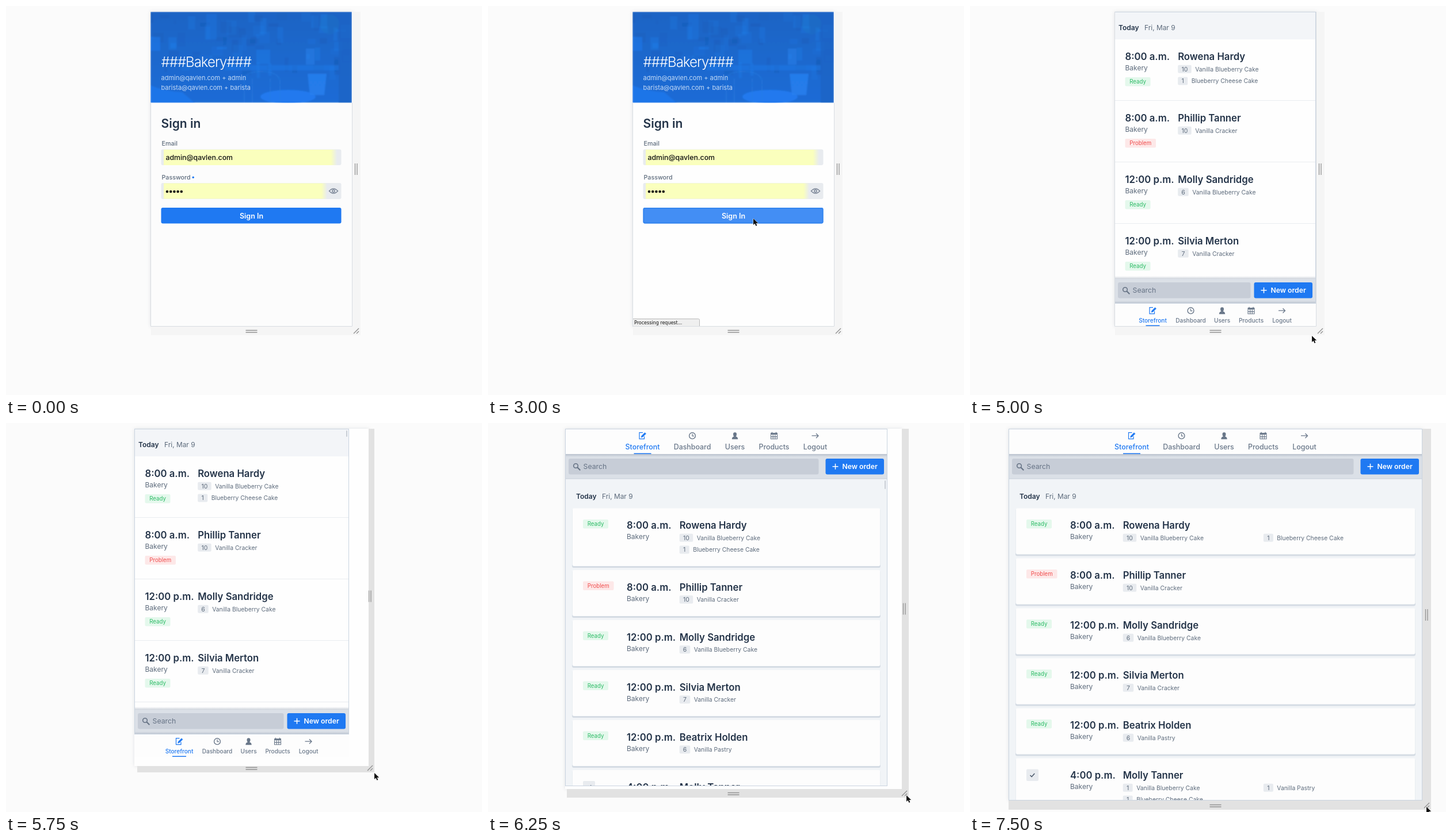
An HTML page that plays this animation: 827x677 px, repeating every 8000 ms.

```html
<!DOCTYPE html>
<html lang="en">
<head>
<meta charset="utf-8">
<title>Bakery app resize</title>
<style>
html, body { margin: 0; width: 100%; height: 100%; overflow: hidden; background: #fbfbfb; }
svg { display: block; width: 100%; height: 100%; }
text { font-family: Inter, Roboto, sans-serif; white-space: pre; }
</style>
</head>
<body>
<svg viewBox="0 0 827 677">
  <defs>
    <linearGradient id="fill">
      <stop offset="0" stop-color="#faffbd"/>
      <stop offset=".965" stop-color="#faffbd"/>
      <stop offset="1" stop-color="#e8ebef"/>
    </linearGradient>
    <linearGradient id="photo" x2="0" y2="1">
      <stop offset="0" stop-color="#1b64c4"/>
      <stop offset="1" stop-color="#1c6cd6"/>
    </linearGradient>
    <linearGradient id="shade" x2="0" y2="1">
      <stop offset="0" stop-color="#8592a6" stop-opacity=".4"/>
      <stop offset="1" stop-color="#8592a6" stop-opacity="0"/>
    </linearGradient>
    <linearGradient id="shadeUp" x2="0" y2="1">
      <stop offset="0" stop-color="#8592a6" stop-opacity="0"/>
      <stop offset="1" stop-color="#8592a6" stop-opacity=".4"/>
    </linearGradient>
    <filter id="soft" x="-20%" y="-20%" width="140%" height="140%"><feGaussianBlur stdDeviation="3"/></filter>
    <filter id="blur"><feGaussianBlur stdDeviation="1.2"/></filter>
    <clipPath id="photoClip"><path d="M251 10h350v158.500h-350z"/></clipPath>
  </defs>
  <g id="stage"></g>
</svg>
<script>
const LOOP = 8000, STEP = 250, TOP = 10, MID = 426.5;
const BLUE = '#1f79f2', INK = '#233348', GREY = '#5d6b7c', NAV = '#697789';
const stage = document.getElementById('stage');

// time, then cursor tip
const cursorKeys = [
  [250, 623, 550], [1250, 601, 450], [1500, 460, 366], [2500, 461, 370], [4000, 461, 370],
  [4250, 474, 390], [4750, 570, 545], [5000, 594, 574], [5250, 606, 566], [5500, 606, 566],
  [5750, 640, 609], [6250, 727, 648], [6750, 778, 661], [7000, 793, 668]
];
// time, grip right and bottom, frame right and bottom, page width and bottom
const sizeKeys = [
  [5500, 616, 573, 602, 558, 350, 558], [5750, 640, 608, 630, 597, 373, 582],
  [6250, 731, 652, 719, 637, 560, 632], [6750, 787, 668, 780, 654, 694, 652],
  [7000, 801, 673, 786, 657, 719, 657]
];
const orders = [
  ['8:00 a.m.', 'Ready', 'Rowena Hardy', ['10', 'Vanilla Blueberry Cake'], ['1', 'Blueberry Cheese Cake']],
  ['8:00 a.m.', 'Problem', 'Phillip Tanner', ['10', 'Vanilla Cracker']],
  ['12:00 p.m.', 'Ready', 'Molly Sandridge', ['6', 'Vanilla Blueberry Cake']],
  ['12:00 p.m.', 'Ready', 'Silvia Merton', ['7', 'Vanilla Cracker']],
  ['12:00 p.m.', 'Ready', 'Beatrix Holden', ['6', 'Vanilla Pastry']],
  ['4:00 p.m.', '', 'Molly Tanner', ['1', 'Vanilla Blueberry Cake'], ['1', 'Vanilla Pastry'], ['1', 'Blueberry Cheese Cake']]
];

const rect = (x, y, w, h, fill, more = '') => `<rect x="${x}" y="${y}" width="${w}" height="${h}" fill="${fill}" ${more}/>`;
const line = (d, color, w = 1, more = '') => `<path d="${d}" fill="none" stroke="${color}" stroke-width="${w}" ${more}/>`;
const text = (x, y, s, size, weight, fill, more = '') =>
  `<text x="${x}" y="${y}" font-size="${size}" font-weight="${weight}" fill="${fill}" ${more}>${s}</text>`;
const middle = 'text-anchor="middle"';
const at = (x, y, body) => `<g transform="translate(${x} ${y})">${body}</g>`;

function tween(keys, t) {
  const i = keys.findIndex(k => k[0] > t);
  if (i === 0) return keys[0].slice(1);
  if (i < 0) return keys[keys.length - 1].slice(1);
  const a = keys[i - 1], b = keys[i], p = (t - a[0]) / (b[0] - a[0]);
  return a.slice(1).map((v, n) => v + (b[n + 1] - v) * p);
}

function makePhoto() {
  let seed = 11, s = rect(251, 10, 350, 158.5, 'url(#photo)');
  const rnd = () => (seed = seed * 16807 % 2147483647) / 2147483647;
  for (let i = 0; i < 70; i++) {
    const x = 251 + rnd() * 335, y = 10 + rnd() * 95;
    s += rect(x, y, 4 + rnd() * 16, 4 + rnd() * 24, rnd() < .5 ? '#1857ae' : '#2380ee', `opacity="${.1 + rnd() * .25}"`);
  }
  s += rect(251, 54, 17, 24, '#2079ec', 'opacity=".6"') + rect(348, 14, 18, 44, '#2079e6', 'opacity=".35"')
    + rect(435, 76, 24, 25, '#2580ee', 'opacity=".4"') + rect(521, 74, 15, 28, '#2782ee', 'opacity=".5"')
    + rect(380, 103, 198, 9, '#217bea', 'opacity=".5"')
    + '<circle cx="562" cy="32" r="17" fill="#2379c4" opacity=".3"/>'
    + '<ellipse cx="490" cy="158" rx="48" ry="12" fill="#2079ee"/>'
    + '<path d="M524 118h33l-4 37h-25z" fill="#2780f0" opacity=".8"/>'
    + '<path d="M251 138q22 10 55 12l22 19h-77z" fill="#2079ee" opacity=".8"/>'
    + line('M414 168v-40q2-14 30-14t32 16v38M428 168v-42M459 168v-42', '#2b80e4', 1.5, 'opacity=".5"')
    + rect(578, 10, 23, 159, '#1b65c6', 'opacity=".8"');
  return `<g clip-path="url(#photoClip)"><g filter="url(#blur)">${s}</g></g>`;
}
const photo = makePhoto();

function signIn(t) {
  const pressed = t >= 2750;
  let s = rect(251, 10, 350, 548, t < 1500 ? '#fcfcfc' : '#fefefe') + photo
    + text(269.5, 106, '###Bakery###', 24, 300, '#fff', 'letter-spacing="-1"')
    + text(269.5, 129, 'admin@qavlen.com + admin', 11, 400, '#c6dcf7')
    + text(269.5, 146, 'barista@qavlen.com + barista', 11, 400, '#c6dcf7')
    + text(269.5, 212, 'Sign in', 21, 600, INK)
    + text(270.5, 243, 'Email', 10.7, 500, GREY)
    + rect(269.5, 249.5, 313, 27.5, '#e8ebef', 'rx="3"') + rect(274, 250, 301, 27, 'url(#fill)')
    + text(277.5, 268, 'admin@qavlen.com', 12.3, 500, '#111')
    + text(270.5, 301.5, 'Password', 10.7, 500, GREY)
    + rect(269.5, 308, 313, 28, '#e8ebef', 'rx="3"') + rect(274, 308.5, 284, 27, 'url(#fill)');
  if (!pressed) s += `<circle cx="325.200" cy="298.300" r="1.700" fill="${BLUE}"/>`;
  for (let i = 0; i < 5; i++) s += `<circle cx="${280 + i * 6.2}" cy="323" r="2.300" fill="#111"/>`;
  s += line('M561.500 322q7.500-8 15 0q-7.500 8-15 0z', '#7a8596', 1.5)
    + '<circle cx="569" cy="322" r="2" fill="none" stroke="#7a8596" stroke-width="1.500"/>'
    + rect(269.5, 351, 313, 27.5, pressed ? '#438ef4' : BLUE, 'rx="3"');
  if (pressed) s += rect(270.5, 352, 311, 25.5, 'none', 'rx="2" stroke="#3585ef" stroke-width="2"');
  s += text(MID, 369.5, 'Sign In', 12.5, 600, '#fff', middle);
  if (t >= 3000) {
    s += '<path d="M251.500 544.500h114q2 0 2 2v11h-116z" fill="#efefef" stroke="#b9b9b9"/>'
      + text(254, 554, 'Processing request...', 8, 400, '#111', 'style="font-family:\'DejaVu Sans\',sans-serif"');
  }
  return s;
}

const icons = [
  c => line('M3 1v4.500h-8.500v-11h6', c, 1.2) + line('M-2.500 3l1-3L4-5.500 6-3.500.5 2z', c, .6, `style="fill:${c}"`),
  c => `<circle r="5.400" fill="none" stroke="${c}" stroke-width="1.400"/>` + line('M0-3.500V.5h3', c, 1.2),
  c => `<path d="M0-6q3 0 3 3.300Q3 .5 1.500 1.300q3.700.8 3.700 4.700H-5.200q0-3.900 3.700-4.700Q-3 .5-3-2.700-3-6 0-6z" fill="${c}"/>`,
  c => rect(-6, -5, 12, 3, c) + line('M-5.500-2v7.500h11v-7.500M-5.500 1.700h11M-1.800-2v7.500M1.800-2v7.500', c, 1.1) + line('M-3.500-6.500v2M3.500-6.500v2', c, 1.4),
  c => line('M-6 0H5.500M1.500-4l4 4-4 4', c, 1.3)
];
const tabs = ['Storefront', 'Dashboard', 'Users', 'Products', 'Logout'];

function nav(cx, y, wide, active) {
  const xs = wide ? [-145.5, -59, 15, 83, 154.5] : [-108.5, -42.5, 12, 62.5, 116];
  const size = wide ? 12.4 : 10.1;
  let s = tabs.map((name, i) => {
    const color = active && i === 0 ? BLUE : NAV;
    return at(cx + xs[i], y + 12.2, icons[i](color))
      + text(cx + xs[i], y + (wide ? 36 : 33), name, size, 500, color, middle);
  }).join('');
  const half = wide ? 15 : 12;
  if (active) s += rect(cx + xs[0] - half, y + (wide ? 42.5 : 37.5), half * 2, 1.5, BLUE);
  return s;
}

function toolbar(x, y, right, wide) {
  const bx = right - 107.5, gap = wide ? 12 : 6, top = y + (wide ? 8 : 6), w = right - x;
  const edges = wide
    ? rect(x, y, w, 5, 'url(#shade)') + line(`M${x} ${y + 43}H${right}`, '#c6ced9')
    : rect(x, y - 5, w, 5, 'url(#shadeUp)') + rect(x, y + 38, w, 5, 'url(#shadeUp)');
  return rect(x, y, w, 43, '#dbe0e7') + edges
    + rect(x + 6, top, bx - gap - x - 6, 27.5, '#c7cdd7', 'rx="3"')
    + at(x + 18.5, top + 12.5, '<circle r="3.800" fill="none" stroke="#667385" stroke-width="1.600"/>' + line('M2.800 2.800l5 5', '#667385', 2))
    + text(x + 31.5, top + 18.2, 'Search', 12.3, 400, '#677486')
    + rect(bx, top, 101.5, 27.5, BLUE, 'rx="3"')
    + line(`M${bx + 12} ${top + 13.7}h10m-5-5v10`, '#fff', 1.5)
    + text(bx + 29, top + 18.2, 'New order', 12.2, 600, '#fff');
}

function badge(x, y, status) {
  if (!status) return rect(x, y - 8, 21, 20.5, '#e8ebef', 'rx="2"') + line(`M${x + 6.5} ${y + 2.5}l2.700 2.700 5-5.700`, '#4b596b', 1.6);
  const ok = status === 'Ready', w = ok ? 44 : 53.5;
  return rect(x, y - 7.5, w, 15.5, ok ? '#e4f8ec' : '#fde8e8', 'rx="2"')
    + text(x + w / 2, y + 3.6, status, 9.7, 400, ok ? '#2dbb66' : '#f04c4c', middle);
}

function product(x, y, [count, name]) {
  const w = count === '10' ? 23.5 : count === '1' ? 17 : 18.5;
  return rect(x, y - 7, w, 14, '#e8ebef', 'rx="2"')
    + text(x + w / 2, y + 3.8, count, 10.5, 400, GREY, middle)
    + text(x + w + 6.5, y + 3.8, name, 10.35, 400, GREY);
}

function orderList(x, right, wide, double) {
  const dayX = x + (wide ? 19 : 7), dayY = wide ? 132.3 : 42.3;
  let s = wide ? '' : rect(x, TOP, right - x, 48, '#f3f5f8');
  s += text(dayX, dayY, 'Today', 12, 600, INK) + text(dayX + 45, dayY, 'Fri, Mar 9', 11.9, 400, GREY);
  let y = wide ? 148.5 : 58;
  const timeX = x + (wide ? 107 : 18.5), nameX = timeX + 91.7;
  for (const [time, status, name, ...items] of orders) {
    const rows = double ? Math.ceil(items.length / 2) : items.length;
    const h = wide ? 80 + 20.5 * (rows - 1) : 107;
    if (wide) {
      const w = right - x - 25;
      s += rect(x + 12, y + 1, w + 1, h + 2, '#d5dce4', 'rx="3"') + rect(x + 12.5, y, w, h, '#fdfdfd', 'rx="3"');
    } else {
      s += rect(x, y, right - x, h, '#fefefe') + line(`M${x} ${y + h - .5}H${right}`, '#e9ecf0');
    }
    const top = wide ? y : y + .5;
    s += text(timeX, top + 35.5, time, 16.7, 600, INK) + text(timeX, top + 53.7, 'Bakery', 12, 400, GREY)
      + text(nameX, top + 35.5, name, 16.7, 600, INK)
      + badge(wide ? x + 31 : timeX, wide ? y + 27 : y + 73.5, status);
    const second = (nameX + right - 32) / 2;
    items.forEach((item, i) => {
      const col = double ? i % 2 : 0, row = double ? i >> 1 : i;
      s += product(col ? second : nameX, top + 51.3 + row * 20.6, item);
    });
    y += wide ? h + 7 : h;
  }
  return s;
}

function storefront(t, x, width, bottom) {
  const wide = width >= 466, double = width >= 622, loaded = t >= 4250;
  const right = x + width, cx = x + width / 2;
  const h = bottom - TOP, navY = wide ? TOP : bottom - 40, barY = wide ? 54 : bottom - 83;
  let s = rect(x, TOP, width, h, wide ? '#f1f4f7' : '#f4f6f9');
  if (loaded) s += orderList(x, right, wide, double);
  s += rect(x, navY, width, wide ? 44 : 40, loaded ? '#fdfdfd' : '#f7f8fa') + toolbar(x, barY, right, wide)
    + nav(cx, navY, wide, loaded);
  if (t >= 5750 && t < 7500) s += rect(right - 5, wide ? 100 : 13, 2, wide ? 15 : 11, '#c9ced5', 'rx="1"');
  const edge = wide ? h : h - 40;
  s += rect(x + .5, TOP + .5, width - 1, edge - 1, 'none', 'stroke="#cad4e0"');
  return `<clipPath id="page">${rect(x, TOP, width, h, '#000')}</clipPath><g clip-path="url(#page)">${s}</g>`;
}

function frame(t) {
  const [gripR, gripB, right, bottom, width, pageB] = tween(sizeKeys, t);
  const left = 2 * MID - right, gripL = 2 * MID - gripR + 15;
  const strip = t >= 5750 ? '#e2e2e2' : '#f5f5f5', mark = '#929292';
  const x = gripR - 8, y = gripB - 7, my = (gripB - 5) / 2;
  let s = rect(left, TOP, right - left, bottom - TOP, '#9aa1aa', 'opacity=".28" filter="url(#soft)"')
    + rect(gripL, bottom, gripR - gripL, gripB - bottom, strip)
    + rect(right, TOP, gripR - right, gripB - TOP, strip)
    + line(`M${x - 1.5} ${my - 10}v20m3.500 0v-20`, mark, 1.3)
    + line(`M${MID - 10} ${y - 1.5}h20m0 3.500h-20`, mark, 1.3)
    + line(`M${x - 4} ${y + 4}l9-9M${x + 1} ${y + 4}l4-4`, mark, 1.4)
    + rect(left, TOP, right - left, bottom - TOP, '#fefefe');
  s += t < 4000 ? signIn(t) : storefront(t, left, width, pageB);
  if (t < 5750) {
    const top = t < 4000 ? 168.5 : TOP;
    s += line(`M${left + .5} ${top}V${bottom - .5}H${right - .5}V${top}`, '#d9dde2');
  }
  if (t >= 250) {
    const [cx, cy] = tween(cursorKeys, t);
    s += at(cx, cy, '<path d="M0 0v11l2.600-2.400 1.800 4.200 2-.9-1.800-4h3.600z" fill="#111" stroke="#fff" stroke-width="1" paint-order="stroke"/>');
  }
  return s;
}

let shown = -1;
const start = performance.now();
function tick() {
  const t = Math.floor((performance.now() - start) % LOOP / STEP) * STEP;
  if (t !== shown) stage.innerHTML = frame(shown = t);
  requestAnimationFrame(tick);
}
tick();
</script>
</body>
</html>
```
